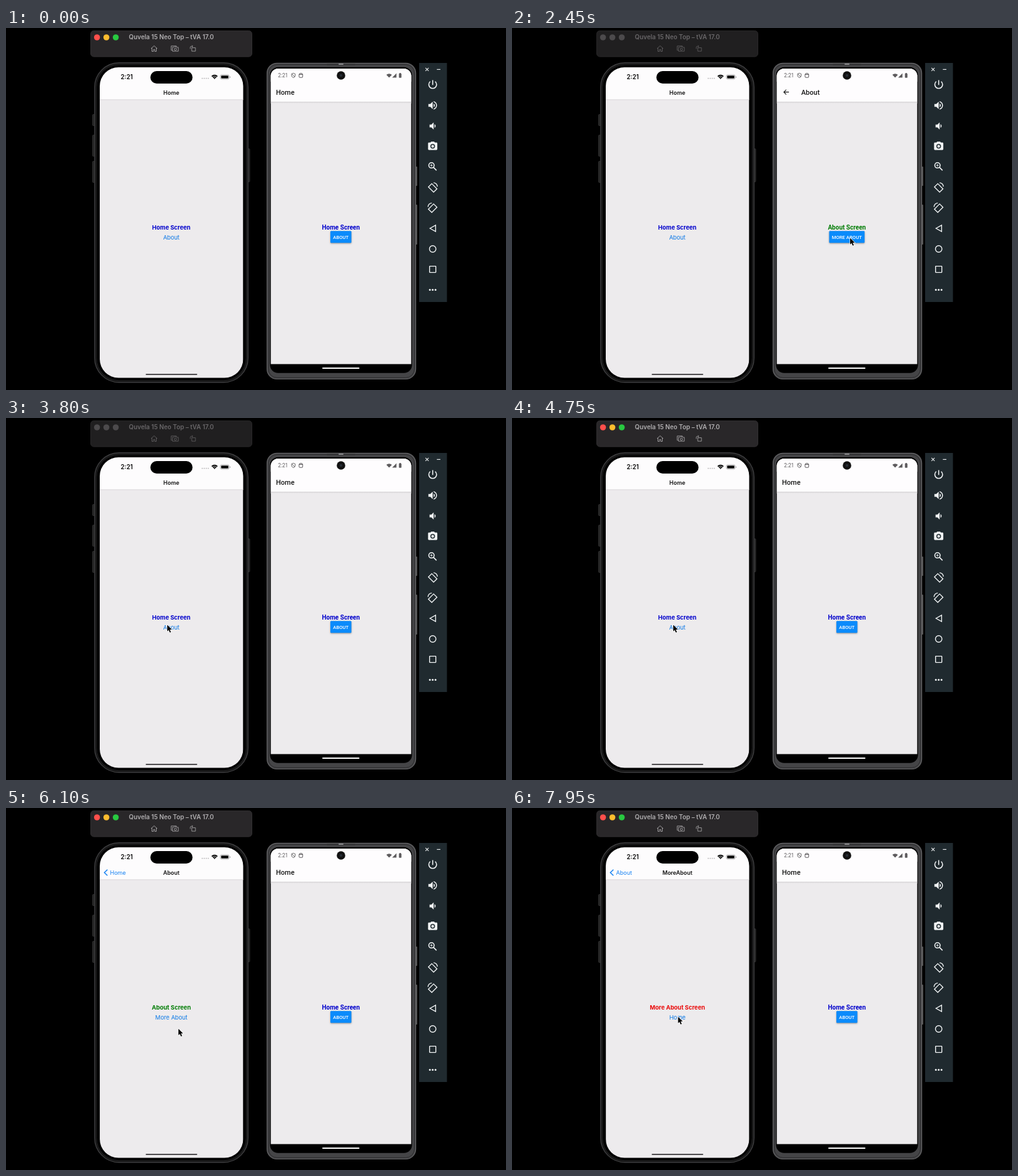
These frames come from a looping animation (800 px wide and 580 px high, 8 s). An HTML page with a canvas:

```html
<!DOCTYPE html>
<html lang="en">
<head>
<meta charset="utf-8">
<title>Navigation demo</title>
<style>
html, body { margin: 0; width: 100%; height: 100%; overflow: hidden; background: #000; }
canvas { display: block; }
</style>
</head>
<body>
<canvas id="stage" width="800" height="580"></canvas>
<script>
const ctx = document.getElementById('stage').getContext('2d');
const LOOP = 8000, STEP = 50;
const BODY = '#edebed';
const SANS = 'Inter, "Liberation Sans", sans-serif';
const ROBOTO = 'Roboto, "Liberation Sans", sans-serif';

const screens = [
  { title: 'Home', head: 'Home Screen', color: '#0000cc', link: 'About' },
  { title: 'About', head: 'About Screen', color: '#007c04', link: 'More About' },
  { title: 'MoreAbout', head: 'More About Screen', color: '#ea0a0a', link: 'Home' }
];
const pushes = [5350, 7277];
const moves = [
  { t: 1700, from: 0, to: 1 },
  { t: 2580, from: 1, to: 2 },
  { t: 3200, from: 2, to: 0 }
];
const pointer = [
  [300, 478, 295], [350, 515, 325.5], [800, 515, 325.5], [1150, 541, 336.5],
  [3400, 541, 336.5], [3750, 258, 331.5], [5400, 258, 331.5], [5550, 277, 356],
  [6000, 277, 356], [6500, 265.7, 334.5]
];

const clamp = v => Math.max(0, Math.min(1, v));
const easeOut = v => 1 - (1 - v) ** 3;
const smooth = v => v * v * (3 - 2 * v);

function box(x, y, w, h, r, fill, stroke, lw = 1) {
  ctx.beginPath();
  ctx.roundRect(x, y, w, h, r);
  if (fill) { ctx.fillStyle = fill; ctx.fill(); }
  if (stroke) { ctx.strokeStyle = stroke; ctx.lineWidth = lw; ctx.stroke(); }
}

function dot(x, y, r, fill) {
  ctx.beginPath();
  ctx.arc(x, y, r, 0, 7);
  ctx.fillStyle = fill;
  ctx.fill();
}

function text(s, x, y, font, fill, align = 'center', alpha = 1) {
  ctx.save();
  ctx.globalAlpha *= alpha;
  ctx.font = font;
  ctx.fillStyle = fill;
  ctx.textAlign = align;
  ctx.fillText(s, x, y);
  ctx.restore();
}

// Draws a 24-unit icon path centred on (x, y).
function icon(d, x, y, scale, color, lw) {
  ctx.save();
  ctx.translate(x, y);
  ctx.scale(scale, Math.abs(scale));
  ctx.translate(-12, -12);
  const path = new Path2D(d);
  if (lw) {
    ctx.lineWidth = lw;
    ctx.strokeStyle = color;
    ctx.stroke(path);
  } else {
    ctx.fillStyle = color;
    ctx.fill(path, 'evenodd');
  }
  ctx.restore();
}

function clipped(x, y, w, h, r, draw) {
  ctx.save();
  ctx.beginPath();
  ctx.roundRect(x, y, w, h, r);
  ctx.clip();
  draw();
  ctx.restore();
}

function wifi(x, y, r, fill) {
  ctx.beginPath();
  ctx.moveTo(x, y);
  ctx.arc(x, y, r, -Math.PI * .75, -Math.PI * .25);
  ctx.fillStyle = fill;
  ctx.fill();
}

function titlePanel(active) {
  box(135.5, 4.5, 258, 41.5, 5, active ? '#292729' : '#201f20', active ? '#302e30' : '#282728');
  ['#ff4f4b', '#fdbc2e', '#28c840'].forEach((c, i) =>
    dot(145.6 + 15 * i, 15, 4.8, active ? c : '#4c4a4c'));
  text('Quvela 15 Neo Top – tVA 17.0', 264.5, 18, '600 9.9px ' + SANS, active ? '#b0aeb0' : '#686668');
  const c = active ? '#a09ea0' : '#5c5a5c';
  icon('M2 12L12 3l10 9M5 10v11h5v-6h4v6h5V10', 237, 33, .5, c, 1.9);
  icon('M4 17H1V4h16v3M5 8h4l2-2h5l2 2h5v12H5zM17.5 14a3.5 3.5 0 1 0-7 0a3.5 3.5 0 1 0 7 0', 270, 33, .52, c, 1.8);
  icon('M8 9h13v12H8zM3 13V8q0-4 4-4h5M9 1l3 3l-3 3', 299, 33, .46, c, 2);
}

function iosBody(i, dx, dy, linkAlpha) {
  const s = screens[i], x = 264.5 + dx;
  ctx.fillStyle = BODY;
  ctx.fillRect(150 + dx, 115, 229.5, 446);
  text(s.head, x, 322.5 + dy, '700 9.4px ' + SANS, s.color);
  text(s.link, x, 338.5 + dy, '400 9.3px ' + SANS, '#0b78e6', 'center', linkAlpha);
}

function iosHeader(i, p) {
  const bold = '600 8.9px ' + SANS, plain = '400 9px ' + SANS, blue = '#1380f2';
  const show = clamp(1.3 * p - .3);
  ctx.fillStyle = '#fdfcfd';
  ctx.fillRect(150, 63, 230, 52);
  ctx.fillStyle = '#cfcdcf';
  ctx.fillRect(150, 114.5, 230, .8);
  if (i > 0) text(screens[i - 1].title, 264.5 - 60 * p, 106.8, bold, '#101010', 'center', clamp(1.05 - 1.5 * p));
  text(screens[i].title, 264.5 + 132 * (1 - p), 106.8, bold, '#101010', 'center', show);
  if (i > 1) text(screens[i - 2].title, 166.5 - 10 * p, 106.8, plain, blue, 'left', clamp(1.1 - 2 * p));
  if (i > 0) {
    text(screens[i - 1].title, 166.5 + 104 * (1 - p), 106.8, plain, blue, 'left', show);
    ctx.save();
    ctx.globalAlpha = i > 1 ? 1 : clamp(3 * p);
    ctx.beginPath();
    ctx.moveTo(162.3, 98.7);
    ctx.lineTo(157.4, 103.5);
    ctx.lineTo(162.3, 108.3);
    ctx.strokeStyle = blue;
    ctx.lineWidth = 1.5;
    ctx.stroke();
    ctx.restore();
  }
}

function iosPhone(t) {
  for (const [y, h] of [[138.5, 18], [171.5, 34], [213.5, 34]]) box(138.5, y, 4, h, 1, '#242424', '#3a3a3a', .7);
  box(386, 193.5, 4, 53, 1, '#242424', '#3a3a3a', .7);
  box(141.8, 55.8, 245.5, 512, 39, '#161616', '#3d3d3f', 1.4);
  box(144.8, 58.8, 239.5, 506, 36, '#000', '#1f1f20', 1);

  const i = pushes.filter(s => t >= s).length;
  const age = i ? (t - pushes[i - 1]) * .014 : 0;
  const p = i ? 1 - (1 + age) * Math.exp(-age) : 1;
  clipped(150, 63, 229.5, 497.5, 30, () => {
    if (i && p < .998) {
      iosBody(i - 1, -68.7 * p, 0, Math.max(.2, clamp(1.15 - 3.5 * p)));
      ctx.fillStyle = `rgba(0,0,0,${.11 * p})`;
      ctx.fillRect(150, 115, 230, 446);
    }
    const settled = !i || t >= pushes[i - 1] + 470;
    iosBody(i, 229 * (1 - p), settled ? 0 : 35, 1);
    iosHeader(i, p);
  });

  box(231, 69, 67.5, 20, 10, '#000');
  text('2:21', 193.2, 82.2, '600 9.7px ' + SANS, '#080808');
  for (let k = 0; k < 4; k++) dot(314 + 3.2 * k, 80.7, .9, '#b5b3b5');
  wifi(333.7, 82, 7.2, '#080808');
  ctx.strokeStyle = '#fdfcfd';
  ctx.lineWidth = .7;
  for (const r of [2.5, 4.9]) {
    ctx.beginPath();
    ctx.arc(333.7, 82, r, Math.PI * 1.2, Math.PI * 1.8);
    ctx.stroke();
  }
  box(343, 75, 14, 7, 2.2, null, '#9a989a', .8);
  box(344.2, 76.2, 11.6, 4.6, 1.2, '#080808');
  box(358, 77.4, 1, 2.4, .5, '#9a989a');
  box(223.5, 554, 82.5, 2, 1, '#4c4a4c');
}

function droidScreen(i, dx, alpha) {
  const s = screens[i], label = s.link.toUpperCase();
  ctx.save();
  ctx.globalAlpha = alpha;
  ctx.translate(dx, 0);
  ctx.fillStyle = BODY;
  ctx.fillRect(398, 65, 276, 474);
  const g = ctx.createLinearGradient(0, 118, 0, 121);
  g.addColorStop(0, '#d6d4d6');
  g.addColorStop(1, BODY);
  ctx.fillStyle = g;
  ctx.fillRect(398, 118, 276, 3);
  ctx.fillStyle = '#fefdfe';
  ctx.fillRect(398, 65, 276, 53);
  text(s.title, i ? 462.8 : 432, 106.6, '500 11px ' + ROBOTO, '#171717', 'left');
  if (i) icon('M22 12H3M12 3L3 12l9 9', 438.8, 102.7, .43, '#171717', 2.7);
  text(s.head, 535.8, 322.6, '700 10px ' + ROBOTO, s.color);

  const font = '500 7.7px ' + ROBOTO;
  ctx.font = font;
  const w = ctx.measureText(label).width + 8.6;
  ctx.shadowColor = 'rgba(0,0,0,.4)';
  ctx.shadowBlur = 2.5;
  ctx.shadowOffsetY = 1;
  box(535.8 - w / 2, 325.2, w, 19, 1.2, '#0b8bfb');
  ctx.shadowColor = 'transparent';
  text(label, 535.8, 337.9, font, '#fff');
  ctx.restore();
}

function droidContent(t) {
  const m = moves.filter(v => t >= v.t).pop();
  if (!m) return droidScreen(0, 0, 1);
  const e = easeOut(clamp((t - m.t) / 400));
  const fade = clamp((t - m.t - 40) / 110);
  if (e === 1) return droidScreen(m.to, 0, 1);
  if (m.to > m.from) {
    droidScreen(m.from, -22 * e, 1);
    droidScreen(m.to, 22 * (1 - e), fade);
  } else {
    droidScreen(m.to, -22 * (1 - e), 1);
    droidScreen(m.from, 22 * e, 1 - fade);
  }
}

function droidPhone(t) {
  box(654, 222, 4, 31, 1, '#555');
  box(654, 283, 4, 64, 1, '#555');
  box(417.6, 56.3, 238, 506.2, 16, '#454547', '#626264', 1.2);
  box(419.8, 58.5, 233.6, 501.8, 14, null, '#2c2c2e', 1);
  box(422.4, 62.8, 227.2, 490, 13, '#000');
  box(513, 57.3, 46, 2.2, 1, '#333335');
  box(532, 57, 8, 2, 1, '#858587');
  clipped(423.7, 65, 224.6, 473.5, [12, 12, 0, 0], () => {
    droidContent(t);
    ctx.fillStyle = '#fefdfe';
    ctx.fillRect(423, 65, 226, 21);
  });
  box(506, 544, 59.5, 2, 1, '#fff');

  const c = '#5c5a5c';
  text('2:21', 435.3, 79, '400 8.2px ' + ROBOTO, c, 'left');
  icon('M12 2L4 5v7q0 7 8 10q8-3 8-10V5zM6 5l12 14', 459.8, 76, .36, c, 2.6);
  icon('M4 8h16v9q0 4-4 4H8q-4 0-4-4zM4 8l4-5h8l4 5', 471.8, 76, .36, c, 2.8);
  wifi(613, 79.5, 6.2, c);
  icon('M2 22h20V2z', 621.3, 76, .34, c);
  box(628.7, 73, 4, 6.7, .7, c);
  box(629.8, 72, 1.8, 1.4, .2, c);
  dot(536, 76, 6.8, '#111');
  dot(536, 76, 2.3, '#252b33');
}

function toolbar() {
  const W = '#f2f5f6', x = 682.7;
  const speaker = 'M3 9v6h4l5 5V4L7 9zM14 8v8q2.5-1.2 2.5-4t-2.5-4z';
  const turn = 'M10 3.5L21.5 15L14 22.5L2.5 11zM14 1.5q7.500 1 8.500 8.500';
  box(661, 56, 44.5, 383, 0, '#202a2f');
  icon('M6 6l12 12M18 6L6 18', 673.7, 66.4, .42, W, 2.5);
  icon('M5 12h14', 692.2, 66.4, .4, W, 2.8);
  icon('M13 3h-2v10h2zM17.8 5.2l-1.4 1.4A7 7 0 1 1 7.6 6.6L6.2 5.2A9 9 0 1 0 17.8 5.2z', x, 90.5, .78, W);
  icon(speaker + 'M14 3v2.2q5 1.8 5 6.8t-5 6.8V21q7-2 7-9t-7-9z', x, 124, .76, W);
  icon(speaker, x + 1.5, 157, .72, W);
  icon('M9 2L7 4H4q-2 0-2 2v12q0 2 2 2h16q2 0 2-2V6q0-2-2-2h-3l-2-2zM17 12a5 5 0 1 0-10 0a5 5 0 1 0 10 0zM15 12a3 3 0 1 0-6 0a3 3 0 1 0 6 0z', x, 189.5, .74, W);
  icon('M15 9.5a5.5 5.5 0 1 0-11 0a5.5 5.5 0 1 0 11 0M13.8 13.8l6 6', x, 222, .78, W, 2);
  icon('M9.5 7v5M7 9.5h5', x, 222, .78, W, 1.2);
  icon(turn, x, 255.5, .72, W, 1.9);
  icon(turn, x, 288, -.72, W, 1.9);
  icon('M18.5 5v14L6 12z', x, 321, .72, W, 1.9);
  ctx.beginPath();
  ctx.arc(x, 354, 5.2, 0, 7);
  ctx.strokeStyle = W;
  ctx.lineWidth = 1.4;
  ctx.stroke();
  box(x - 5, 381.6, 10, 10, .5, null, W, 1.4);
  for (const d of [-4.5, 0, 4.5]) dot(x + d, 419.4, 1.5, W);
}

function cursor(t) {
  if (t < pointer[0][0]) return;
  const k = pointer.findLastIndex(q => t >= q[0]);
  const a = pointer[k], b = pointer[k + 1] || a;
  const u = a === b ? 0 : smooth((t - a[0]) / (b[0] - a[0]));
  ctx.save();
  ctx.translate(a[1] + (b[1] - a[1]) * u, a[2] + (b[2] - a[2]) * u);
  ctx.scale(.94, .94);
  const arrow = new Path2D('M0 0v11l2.5-2.3l1.9 4.3l1.9-.8l-1.9-4.2h3.5z');
  ctx.strokeStyle = '#fff';
  ctx.lineWidth = 1.4;
  ctx.stroke(arrow);
  ctx.fillStyle = '#000';
  ctx.fill(arrow);
  ctx.restore();
}

function draw(t) {
  ctx.fillStyle = '#000';
  ctx.fillRect(0, 0, 800, 580);
  titlePanel(t < 1200 || t >= 4400);
  iosPhone(t);
  droidPhone(t);
  toolbar();
  cursor(t);
}

const start = performance.now();
function tick() {
  const t = (performance.now() - start) % LOOP;
  draw(Math.floor(t / STEP) * STEP);
  requestAnimationFrame(tick);
}
tick();
</script>
</body>
</html>
```
